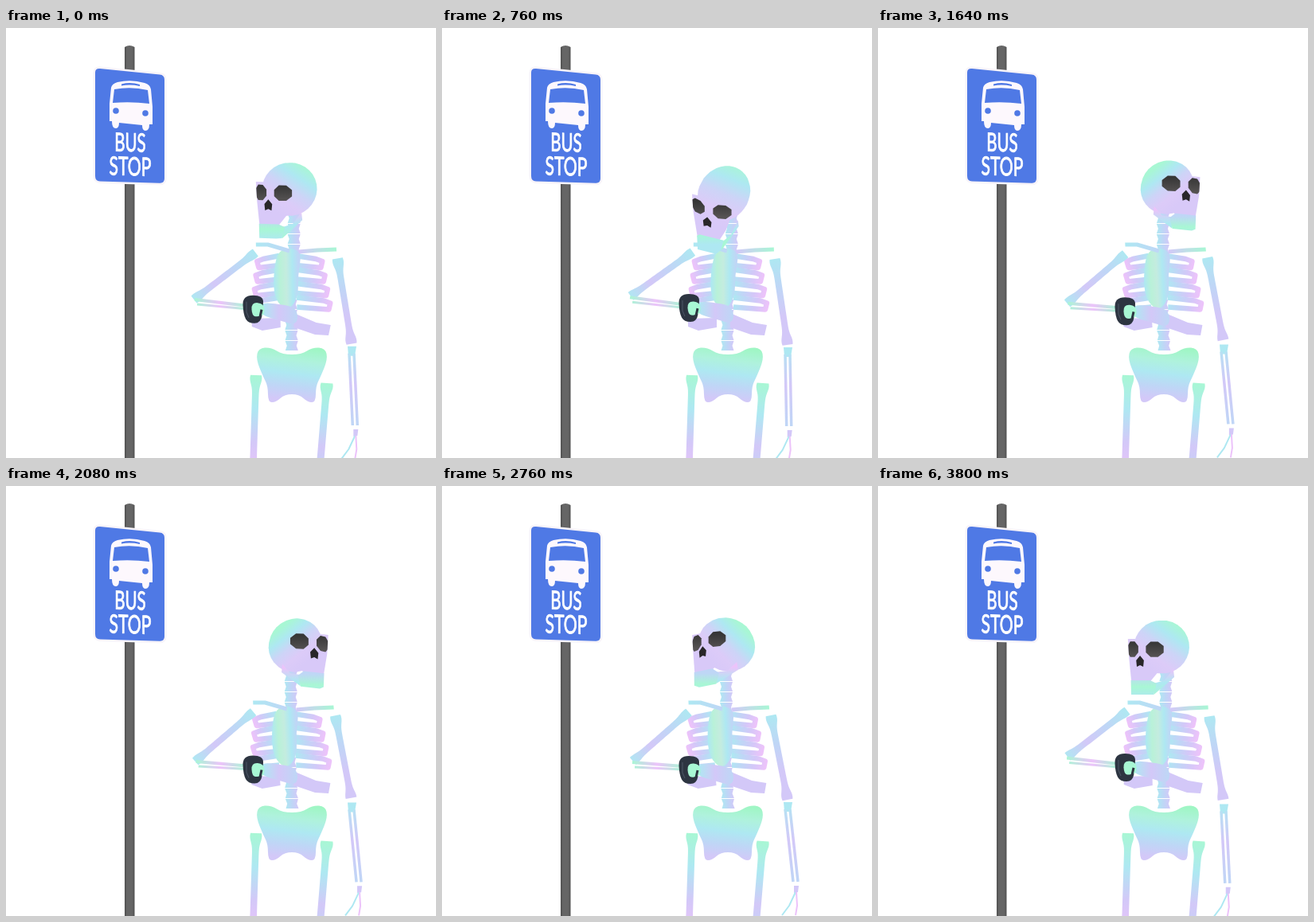
An HTML page with a canvas that plays this animation: 540 px wide and 540 px high, repeating every 3840 ms.

```html
<!DOCTYPE html>
<html lang="en">
<head>
<meta charset="utf-8">
<title>Bus stop</title>
<style>
html, body { margin: 0; width: 100%; height: 100%; overflow: hidden; background: #fff; }
svg, canvas { position: absolute; left: 0; top: 0; width: 540px; height: 540px; }
text { font: 32px Lato, "Open Sans", sans-serif; fill: #fff; stroke: #fff; text-anchor: middle; }
</style>
</head>
<body>
<svg viewBox="0 0 540 540">
  <defs>
    <linearGradient id="steel">
      <stop offset="0" stop-color="#505050"/>
      <stop offset=".25" stop-color="#666"/>
      <stop offset=".75" stop-color="#666"/>
      <stop offset="1" stop-color="#505050"/>
    </linearGradient>
  </defs>
  <path d="M149 24Q155 20 161.500 24V540H149Z" fill="url(#steel)"/>
  <path d="M118 51L193 58.500Q199 59 199 65V189Q199 195 193 194.700L118 192.500Q112 192 112 186V56Q112 50.500 118 51Z"
    fill="#4f79e5" stroke="#f8f4f9" stroke-width="5" paint-order="stroke"/>
  <g fill="#fdf8fd">
    <path d="M130 95L132 75Q133 70 140 68Q157 64 174 69Q181 71 182 77L184 99V121H180Q180 129 175 129Q171 129 171 122L142 119Q142 126 138 126Q133 126 133 117H130Z"/>
    <g fill="#4f79e5">
      <path d="M136 77Q157 73 178 78L180 95Q157 92 134 94Z"/>
      <path d="M145 70.500Q156 67.500 168 71V73Q156 70.500 145 72.500Z"/>
      <circle cx="138" cy="104" r="3.800"/>
      <circle cx="175" cy="107" r="3.800"/>
    </g>
  </g>
  <text transform="matrix(.64 .02 0 1 156 155)">BUS</text>
  <text transform="matrix(.66 .02 0 1 156 185)">STOP</text>
</svg>
<canvas id="stage" width="540" height="540"></canvas>
<script>
const ctx = document.getElementById('stage').getContext('2d');
const LOOP = 3840, STEP = 40, LEAD = 200;
const MINT = '#a8f7d4', CYAN = '#aee8f2', BLUE = '#bfd6f6', LAV = '#d3c8f8', PINK = '#ecc3fa';

// Poses: head centre x and y, yaw, pitch, body sway
const LEFT = [357.5, 199, -41, -14, 1];
const DOWN = [354, 208, -27, 29, 0];
const RIGHT = [363.5, 200, 31, -11, .87];
// Moves: begin, duration, pose reached; the loop is entered at PHASE
const MOVES = [[0, 1040, DOWN], [1320, 800, RIGHT], [2570, 590, LEFT]];
const PHASE = 440;

const mix = (a, b, k) => a + (b - a) * k;

function ease(u) {
  u = Math.min(1, Math.max(0, u));
  return u * u * (3 - 2 * u);
}

function poseAt(t) {
  const u = (t + PHASE) % LOOP;
  return MOVES.reduce((pose, [begin, time, next]) =>
    pose.map((v, i) => mix(v, next[i], ease((u - begin) / time))), LEFT);
}

function shade(x1, y1, x2, y2, ...colors) {
  const g = ctx.createLinearGradient(x1, y1, x2, y2);
  colors.forEach((c, i) => g.addColorStop(i / (colors.length - 1), c));
  return g;
}

function poly(pts, fill) {
  ctx.beginPath();
  pts.forEach(p => ctx.lineTo(...p));
  ctx.fillStyle = fill;
  ctx.fill();
}

// Closed smooth curve guided by a few points
function blob(pts, fill) {
  ctx.beginPath();
  pts.forEach(([x, y], i) => {
    const [nx, ny] = pts[(i + 1) % pts.length];
    const mx = (x + nx) / 2, my = (y + ny) / 2;
    if (i) ctx.quadraticCurveTo(x, y, mx, my);
    else ctx.moveTo(mx, my);
  });
  const [a, b] = pts;
  ctx.quadraticCurveTo(...a, (a[0] + b[0]) / 2, (a[1] + b[1]) / 2);
  ctx.fillStyle = fill;
  ctx.fill();
}

function line(pts, color, width) {
  ctx.beginPath();
  pts.forEach(p => ctx.lineTo(...p));
  ctx.strokeStyle = color;
  ctx.lineWidth = width;
  ctx.stroke();
}

// Shaft of width w that flares to k at both ends
function bone(x1, y1, x2, y2, w, k, ...colors) {
  const len = Math.hypot(x2 - x1, y2 - y1);
  ctx.save();
  ctx.translate(x1, y1);
  ctx.rotate(Math.atan2(y2 - y1, x2 - x1));
  const edge = [];
  for (let x = 0; x <= len; x += len / 40) {
    const d = Math.min(x, len - x);
    edge.push([x, (w + (k - w) * Math.exp(-((d - 4) ** 2) / 90)) / 2]);
  }
  poly([...edge, ...edge.map(([x, y]) => [x, -y]).reverse()], shade(0, 0, len, 0, ...colors));
  ctx.restore();
}

function spine(x, top, bottom) {
  for (let y = top; y < bottom; y += 13) {
    poly([[x - 8, y], [x + 8, y], [x + 6, y + 6], [x + 8, y + 12], [x - 8, y + 12], [x - 6, y + 6]],
      shade(x - 8, 0, x + 8, 0, CYAN, BLUE, LAV));
  }
}

function hull(points) {
  const half = pts => {
    const out = [];
    for (const p of pts) {
      while (out.length > 1) {
        const [a, b] = out.slice(-2);
        if ((b[0] - a[0]) * (p[1] - a[1]) > (b[1] - a[1]) * (p[0] - a[0])) break;
        out.pop();
      }
      out.push(p);
    }
    return out.slice(0, -1);
  };
  const pts = points.slice().sort((a, b) => a[0] - b[0] || a[1] - b[1]);
  return [...half(pts), ...half(pts.reverse())];
}

const flip = pts => pts.map(([x, ...rest]) => [-x, ...rest]);
const mirror = pts => [...pts, ...flip(pts)];

const SKULL = [];
for (let a = .2; a < Math.PI; a += .2) {
  for (let b = 0; b < 6.28; b += .3) {
    SKULL.push([31 * Math.sin(a) * Math.cos(b), -33.5 * Math.cos(a), 41 * Math.sin(a) * Math.sin(b)]);
  }
}
const FACE = mirror([[27, -10, 35], [26, 14, 34], [20, 31, 34], [15, 43, 44], [8, 20, 45]]);
const CHIN = mirror([[15, 42, 45], [17, 46, 34], [14, 60, 36], [13, 60, 47]]);
const RAMUS = [[24, 28, 8], [24, 38, 6], [15, 60, 37], [17, 46, 40], [22, 42, 24]];
const NOSE = [[0, 11, 46], [6, 17, 46], [5, 25, 46], [0, 23, 46], [-5, 25, 46], [-6, 17, 46]];
const SOCKET = Array.from({ length: 8 }, (_, i) => {
  const a = (i + .5) * Math.PI / 4;
  const x = 17 + 12 * Math.cos(a);
  return [x, 3 + 10.5 * Math.sin(a), 42 - .01 * x * x];
});

function head([cx, cy, yaw, pitch]) {
  const rad = Math.PI / 180;
  const cs = Math.cos(yaw * rad), sn = Math.sin(yaw * rad);
  const cp = Math.cos(pitch * rad), sp = Math.sin(pitch * rad);
  const project = ([x, y, z]) => [cx + x * cs + z * sn, cy + y * cp + (z * cs - x * sn) * sp];
  const place = pts => pts.map(project);

  const skull = hull(place(SKULL)), face = hull(place(FACE));
  const skin = shade(...project([0, -30, -28]), ...project([0, 24, 36]),
    MINT, CYAN, '#cdd4f7', '#dccbf8', '#d8c9f8');
  const cheek = shade(cx, cy + 28, cx, cy + 62, PINK, CYAN, MINT);
  const sides = yaw < 0 ? [flip(RAMUS), RAMUS] : [RAMUS, flip(RAMUS)];

  poly(place(sides[0]), cheek);
  poly(skull, skin);
  poly(face, skin);
  poly(place(sides[1]), cheek);
  poly(hull(place(CHIN)), shade(cx, cy + 36, cx, cy + 64, BLUE, MINT, CYAN));

  ctx.save();
  ctx.beginPath();
  for (const shape of [skull, face]) {
    shape.forEach((p, i) => i ? ctx.lineTo(...p) : ctx.moveTo(...p));
    ctx.closePath();
  }
  ctx.clip();
  const ey = project([0, 3, 39])[1];
  const dark = shade(0, ey - 10, 0, ey + 10, '#353535', '#565353');
  mirror([SOCKET]).length && [SOCKET, flip(SOCKET)].forEach(s => poly(place(s), dark));
  poly(place(NOSE), '#292729');
  ctx.restore();
}

function torso(s) {
  ctx.save();
  const lean = 6 * s / 105;
  ctx.transform(1, 0, lean, 1, -385 * lean, 0);
  spine(358.5, 341, 402);
  const rib = (x, tip, y) => {
    const d = Math.sign(tip - x);
    line([[x, y - 1], [tip - 8 * d, y + 3], [tip, y + 6], [tip - 2 * d, y + 14], [x, y + 11]],
      shade(x, y, tip, y + 12, CYAN, BLUE, LAV, PINK), 6.5);
  };
  for (let i = 0; i < 4; i++) {
    rib(366, 399 + 3 * i, 287 + 17.5 * i);
    rib(345, 317 - 2 * i, 287 + 17.5 * i);
  }
  poly([[362, 358], [390, 370], [408, 373], [405, 386], [388, 385], [362, 376]], LAV);
  poly([[309, 365], [345, 364], [345, 376], [322, 380], [309, 375]], LAV);
  blob([[344, 276], [374, 278], [368, 310], [368, 340], [353, 356], [338, 340], [337, 310]],
    shade(338, 0, 369, 0, CYAN, '#b9f1d8', '#c4ecdf', CYAN, BLUE));
  line([[316, 272], [331, 272], [358, 280]], shade(316, 0, 358, 0, CYAN, BLUE), 5);
  line([[370, 281], [393, 279], [417, 278]], shade(370, 0, 417, 0, LAV, MINT), 5);
  ctx.restore();
}

function pelvis() {
  const half = [[12, 8], [26, -1], [42, 0], [45, 14], [36, 36], [30, 48], [30, 68], [20, 68], [9, 58]];
  const pts = [...half, ...flip(half).reverse()].map(([x, y]) => [359 + x, 402 + y]);
  blob(pts, shade(362, 400, 354, 467, '#9ff6c4', '#aff2dc', CYAN, BLUE, LAV));
}

function rightArm(s) {
  const ex = 434, ey = mix(398, 394, s), wx = mix(435.5, 444, s), wy = mix(500, 497, s);
  bone(mix(418, 413, s), mix(290, 288, s), ex, ey, 8, 14, CYAN, BLUE, LAV, LAV);
  poly([[ex - 5, ey + 3], [ex + 6, ey + 3], [ex + 4, ey + 15], [ex - 4, ey + 15]], CYAN);
  for (const d of [-3, 3]) {
    line([[ex + d, ey + 12], [wx + d, wy]], shade(0, ey, 0, wy, CYAN, LAV, BLUE), 3.5);
  }
  poly([[wx - 2, wy + 5], [wx + 4, wy + 5], [wx + 3, wy + 13], [wx - 2, wy + 14]], LAV);
  line([[wx, wy + 13], [wx - 8, wy + 30], [wx - 17, wy + 42]], CYAN, 2);
  line([[wx + 1, wy + 13], [wx + 2, wy + 30], [wx, wy + 42]], PINK, 2);
}

function leftArm(s) {
  const ex = mix(235, 238, s), ey = mix(338, 347, s);
  bone(mix(315, 310, s), mix(281, 284, s), ex, ey, 8, 12, CYAN, BLUE, LAV, CYAN);
  ctx.save();
  ctx.translate(0, 5 * s);
  const sheen = shade(ex, 0, 302, 0, MINT, PINK, MINT);
  line([[ex + 1, ey - 5 * s], [302, 347]], sheen, 4);
  line([[ex + 4, ey + 6 - 5 * s], [302, 351]], sheen, 3);
  blob([[318, 343], [345, 345], [366, 350], [366, 372], [345, 366], [318, 358]],
    shade(322, 0, 364, 0, CYAN, LAV, BLUE));
  blob([[297, 334], [323, 334], [323, 350], [320, 369], [304, 369], [298, 358]], '#2d3541');
  blob([[308, 343], [324, 344], [325, 358], [317, 361], [309, 360]], MINT);
  line([[321, 352], [319, 361], [314, 365]], '#2d3541', 3);
  line([[302, 342], [302, 355], [305, 362]], '#485160', 1.2);
  ctx.restore();
}

function draw(t) {
  const pose = poseAt(t), s = poseAt(t + LEAD)[4];
  ctx.clearRect(0, 0, 540, 540);
  bone(314, 436, 310, 562, 8.5, 15, MINT, CYAN, LAV, PINK);
  bone(403, 446, 393, 566, 9, 16, MINT, CYAN, LAV, BLUE);
  spine(mix(364, 357, s), 233, 284);
  torso(s);
  pelvis();
  rightArm(s);
  leftArm(s);
  head(pose);
}

const start = performance.now();
function tick() {
  const t = (performance.now() - start) % LOOP;
  draw(Math.floor(t / STEP) * STEP);
  requestAnimationFrame(tick);
}
ctx.lineJoin = 'round';
tick();
</script>
</body>
</html>
```
